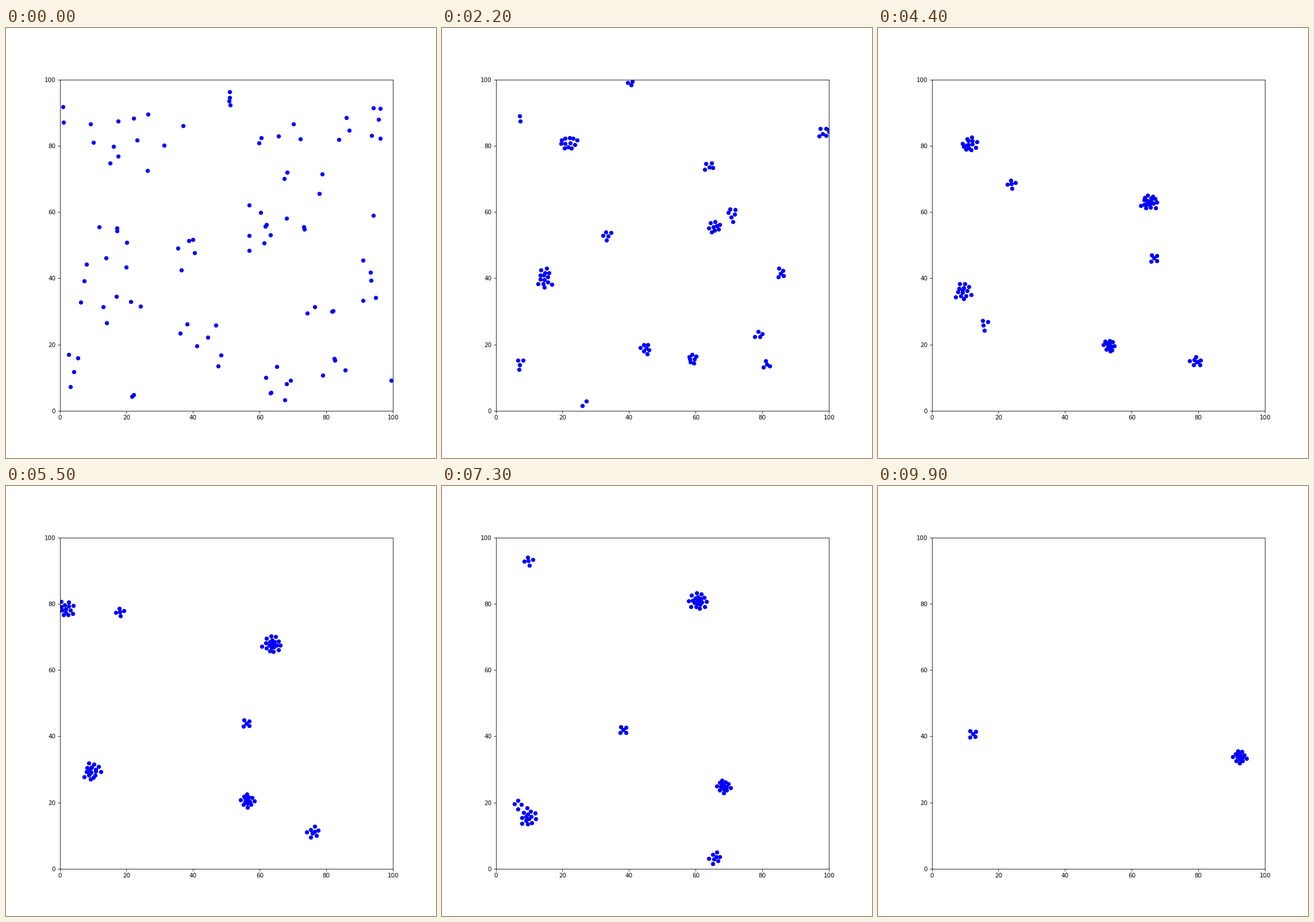
Animation of 748x748 px, one loop 10000 ms. Source, as a matplotlib script:

```python
import numpy as np
import matplotlib.pyplot as plt
from matplotlib.animation import FuncAnimation

SIZE, INCHES, FRAMES, STEP = 748, 10, 100, 100
KEYS = np.array([0, 12, 33, 44, 55, 99])      # frames at which a flock passes its points
PUSH = 0.25                                   # strength of separation

rng = np.random.default_rng(7)
starts, centres = [], []


def track(points):
    """Cubic path through the key points, one position per frame."""
    pts = np.array(points, float)
    keys = KEYS[:len(pts)]
    vel = np.gradient(pts, keys, axis=0)
    t = np.arange(FRAMES)
    i = np.clip(np.searchsorted(keys, t, side="right") - 1, 0, len(keys) - 2)
    h = (keys[i + 1] - keys[i])[:, None]
    over = np.clip(t - keys[-1], 0, None)[:, None]
    s = np.minimum((t - keys[i])[:, None] / h, 1)
    p, q, u, v = pts[i], pts[i + 1], vel[i] * h, vel[i + 1] * h
    curve = p + (q - p) * s**2 * (3 - 2 * s) + u * s * (1 - s)**2 - v * s**2 * (1 - s)
    return curve + vel[-1] * over             # straight on after the last key


def flock(n, spread, *path):
    """n dots scattered by +-spread around the first point of the path."""
    off = rng.uniform(-1, 1, (n, 2)) * spread
    starts.extend(np.clip(path[0] + off - off.mean(axis=0), 0.5, 99.5))
    centres.extend([track(path)] * n)


# shared routes of flocks that merge
west = (11.3, 80.5), (1.9, 78.5), (-37, 70)
south = (9.6, 29.5), (9.6, -8)
north = (65.3, 63), (63.7, 67.8), (55.8, 104.6)
east = (53.2, 19.7), (56.3, 20.6), (92.4, 33.8)
low = (79.3, 14.9), (76, 11.1), (46.3, -9.4)

flock(2, (0.5, 3.5), (1.1, 89.5), (2.3, 89), (12.2, 85.9), *west)
flock(12, (14, 9), (21, 82.1), (22, 82.6), (18.9, 79.3), *west)
flock(14, (11, 16.5), (15.1, 41.3), (15.1, 41.1), (13, 38.3), (9.4, 36.1), *south)
flock(4, (3.6, 10), (3.9, 13), (4.4, 13.3), (11.6, 17.7), (15.8, 26), *south)
flock(5, (11, 5), (65.6, 83), (65.5, 78.6), (62.9, 68.2), *north)
flock(6, (7, 11), (73.1, 64.9), (72.2, 62.1), (68.6, 58.6), *north)
flock(9, (6, 9), (60.8, 55.2), (61.7, 54.3), (68.6, 58.6), *north)
flock(7, (7, 8), (43.2, 21.1), (42.5, 20.6), (49.1, 17.5), *east)
flock(7, (4, 8.5), (65.5, 7.8), (63.4, 10), (54.3, 21), *east)
flock(4, (6, 1.5), (78.6, 30.2), (77, 26.7), (81, 18.7), *low)
flock(4, (5, 5), (82.4, 13.5), (81.7, 13.5), (80.5, 14.5), *low)
flock(5, (6, 8), (38.2, 48.5), (36.1, 49.4), (29.2, 59.5), (23.9, 68.5),
      (18, 77.6), (-0.6, 115.6))
flock(5, (3, 7), (92.7, 38.8), (90.8, 39.4), (77, 44.4), (66.7, 46.1),
      (56, 43.9), (12.3, 40.7))

# flocks and strays that soon leave the box
flock(4, (0.3, 2.5), (51, 94.2), (44.9, 96.5), (35.6, 103))
flock(8, (7, 6), (91.5, 86.4), (93.2, 85.3), (107.2, 82.6))
flock(2, (2, 3.3), (21.9, 4.6), (23.6, 3.8), (30.3, 0.1))
flock(1, (0, 0), (94.1, 59), (100, 67.8))
flock(1, (0, 0), (99.6, 9.2), (105.5, 13))


def simulate():
    """Dots follow their flock's centre, close in on it and keep apart."""
    pos, c = np.array(starts), np.array(centres)
    reach = rng.uniform(1, 2.2, len(pos))
    reach = (reach[:, None] + reach) / 2
    out = [pos]
    for t in range(1, FRAMES):
        gap = pos[:, None] - pos
        dist = np.hypot(gap[..., 0], gap[..., 1])
        force = np.clip(reach - dist, 0, None) / np.maximum(dist, 0.1)
        push = PUSH * (gap * force[..., None]).sum(axis=1)
        pull = 0.05 + 0.06 * np.exp(-t / 15)
        pos = pos + c[:, t] - c[:, t - 1] + pull * (c[:, t - 1] - pos) + push
        out.append(pos)
    return np.array(out)


path = simulate()
fig, ax = plt.subplots(figsize=(INCHES, INCHES), dpi=SIZE / INCHES)
ax.set_xlim(0, 100)
ax.set_ylim(0, 100)
dots, = ax.plot([], [], "bo")


def draw(i):
    dots.set_data(path[i, :, 0], path[i, :, 1])
    return dots,


anim = FuncAnimation(fig, draw, frames=FRAMES, interval=STEP, repeat=True, repeat_delay=0)
plt.show()
```
